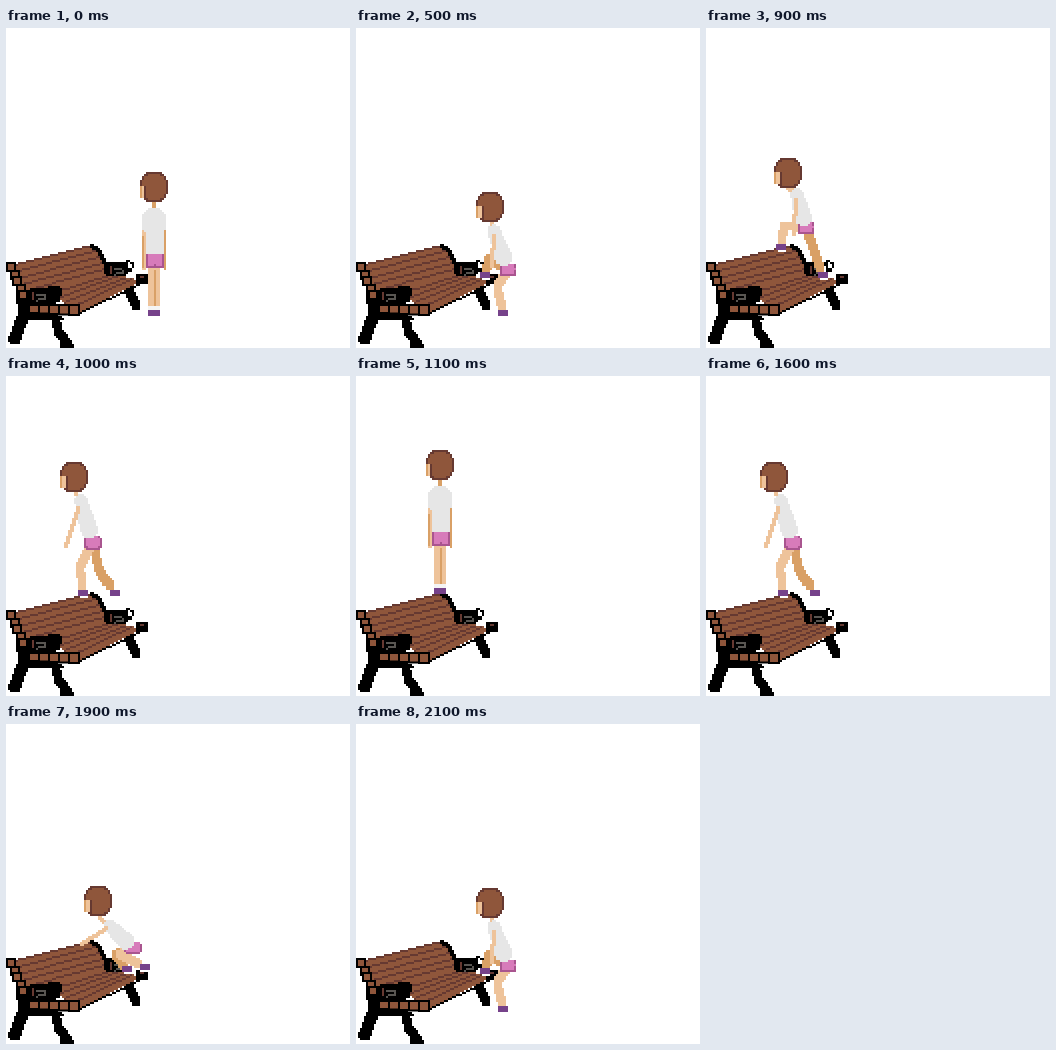
Write an HTML page with a canvas that moves like this. It is 344 px wide and 320 px high and loops after 2120 ms.

```html
<!DOCTYPE html>
<html lang="en">
<head>
<meta charset="utf-8">
<title>Bench climb</title>
<style>
html, body { margin: 0; width: 100%; height: 100%; overflow: hidden; background: #fff; }
canvas { display: block; width: 344px; height: 320px; image-rendering: pixelated; }
</style>
</head>
<body>
<canvas id="stage" width="344" height="320"></canvas>
<script>
(() => {
  const ctx = document.getElementById('stage').getContext('2d');
  const CELL = 2, LOOP = 2120, STEP = 100;
  const BLACK = '#000', WHITE = '#fff', WOOD = '#8f563b', DARK = '#663931', IRON = '#595652';
  const SKIN = '#eec39a', TAN = '#d9a066', SHIRT = '#e6e6e6', PINK = '#d77bba', PLUM = '#a9558f', SHOE = '#76428a';

  const snap = v => Math.round(v / CELL) * CELL;
  const lerp = (a, b, k) => a.map((v, i) => v + (b[i] - v) * k);

  function rect(x, y, w, h, color) {
    ctx.fillStyle = color;
    ctx.fillRect(snap(x), snap(y), w, h);
  }

  // Square brush dragged through points
  function brush(w, color, ...pts) {
    for (let i = 1; i < pts.length; i++) {
      const [x1, y1] = pts[i - 1], [x2, y2] = pts[i];
      const n = Math.max(1, Math.ceil(Math.max(Math.abs(x2 - x1), Math.abs(y2 - y1)) / CELL));
      for (let k = 0; k <= n; k++) {
        const [x, y] = lerp(pts[i - 1], pts[i], k / n);
        rect(x - w / 2, y - w / 2, w, w, color);
      }
    }
  }

  // Superellipse on the coarse grid; a higher power gives squarer corners
  function blob(x, y, rx, ry, power, color) {
    for (let cy = snap(y - ry); cy < y + ry; cy += CELL) {
      const d = Math.abs((cy + 1 - y) / ry);
      if (d >= 1) continue;
      const half = rx * (1 - d ** power) ** (1 / power);
      const left = snap(x - half);
      rect(left, cy, Math.max(0, snap(x + half) - left), CELL, color);
    }
  }

  // Fills between two lines, each given as left point and right point
  function panel(top, bottom, color) {
    const n = 60;
    for (let k = 0; k <= n; k++) {
      brush(CELL, color, lerp(top[0], bottom[0], k / n), lerp(top[1], bottom[1], k / n));
    }
  }

  function plankEnd(x, y, w, h) {
    rect(x, y, w, h, BLACK);
    rect(x + 2, y + 2, w - 4, h - 4, WOOD);
  }

  function slats(top, bottom, count) {
    panel(top, bottom, WOOD);
    for (let i = 0; i < count; i++) {
      brush(CELL, DARK, lerp(top[0], bottom[0], i / count), lerp(top[1], bottom[1], i / count));
    }
  }

  function armrest(x, y, w, h) {
    blob(x + w / 2, y + h / 2, w / 2, h / 2, 4, BLACK);
    brush(2, IRON, [x + 10, y + 7], [x + 18, y + 7], [x + 18, y + 11], [x + 11, y + 12]);
    brush(2, DARK, [x + 7, y + 5], [x + 7, y + 11]);
  }

  function bench() {
    // legs
    panel([[11, 259], [24, 272]], [[13, 291], [57, 291]], BLACK);
    brush(10, BLACK, [16, 290], [11, 304], [9, 310]);
    brush(8, BLACK, [50, 292], [52, 304], [62, 316]);
    rect(2, 308, 10, 6, BLACK);
    rect(54, 316, 14, 4, BLACK);
    brush(8, BLACK, [122, 262], [126, 270], [130, 278]);

    slats([[9, 237], [86, 217]], [[23, 269], [103, 247]], 5);
    slats([[46, 265], [104, 247]], [[73, 283], [133, 253]], 4);
    brush(2, BLACK, [73, 285], [133, 257]);
    brush(4, BLACK, [86, 218], [92, 222], [104, 246]);

    // plank ends
    for (let i = 0; i < 5; i++) plankEnd(i * 3, 234 + i * 7, 10, 10);
    for (let i = 0; i < 5; i++) plankEnd(22 + i * 10, 276, 12, 10 + i / 2);

    armrest(20, 260, 34, 16);
    brush(4, BLACK, [44, 260], [52, 259], [54, 266]);
    armrest(98, 234, 24, 14);
    brush(2, BLACK, [119, 237], [121, 233], [127, 235], [127, 239]);
    brush(4, BLACK, [118, 240], [124, 242]);
    blob(136, 251, 6, 6, 3, BLACK);
    rect(134, 248, 4, 2, DARK);
  }

  function head([x, y], face) {
    x = snap(x);
    y = snap(y);
    blob(x + 14, y + 15, 14, 15, 2.7, DARK);
    blob(x + 14, y + 15, 12, 13, 2.7, WOOD);
    rect(x, y + 14, 2, 12, TAN);
    rect(x + 2, y + 14, face, 12, SKIN);
    rect(x + 2 + face, y + 14, 2, 14, DARK);
  }

  function stand(x, y) {
    ctx.save();
    ctx.translate(x, y);
    brush(4, TAN, [14, 30], [14, 36]);
    // legs, socks, shoes
    rect(8, 96, 12, 40, SKIN);
    rect(14, 98, 2, 36, TAN);
    rect(8, 134, 12, 4, '#f4f4f4');
    rect(8, 138, 12, 6, SHOE);
    // arms
    rect(2, 48, 4, 50, SKIN);
    rect(2, 64, 2, 32, TAN);
    rect(24, 50, 2, 48, TAN);
    // shirt and shorts
    blob(14, 50, 12, 14, 2.5, SHIRT);
    rect(6, 44, 18, 38, SHIRT);
    rect(6, 82, 18, 14, PLUM);
    rect(8, 82, 14, 12, PINK);
    rect(14, 92, 2, 4, PLUM);
    head([0, 0], 2);
    ctx.restore();
  }

  function leg(hip, knee, foot, color) {
    const ankle = lerp(knee, foot, 0.75);
    brush(8, WHITE, ankle, foot);
    brush(8, color, hip, knee, ankle);
    rect(foot[0] - 5, foot[1] - 3, 10, 6, SHOE);
  }

  function climber(p) {
    leg(p.hip, p.farKnee, p.farFoot, TAN);
    leg(p.hip, p.nearKnee, p.nearFoot, SKIN);
    blob(...p.hip, 8.5, 7, 4, PLUM);
    blob(p.hip[0], p.hip[1] - 1, 7, 6, 4, PINK);
    brush(4, SKIN, [p.head[0] + 15, p.head[1] + 30], p.shoulder);
    for (let k = 0; k <= 1; k += 0.05) {
      blob(...lerp(p.shoulder, p.hip, k * 0.72), 6.5 + 2.5 * k, 6.5 + 2 * k, 2, SHIRT);
    }
    brush(4, SKIN, lerp(p.shoulder, p.hand, 0.15), p.hand);
    head(p.head, 4);
  }

  function between(a, b) {
    return Object.fromEntries(Object.keys(a).map(key => [key, lerp(a[key], b[key], 0.5)]));
  }

  const stepUp = {
    head: [120, 164], shoulder: [138, 203], hip: [152, 242], hand: [136, 238],
    nearKnee: [141, 258], nearFoot: [147, 285], farKnee: [133, 230], farFoot: [129, 247]
  };
  const crouch = {
    head: [78, 162], shoulder: [104, 202], hip: [127, 224], hand: [76, 220],
    nearKnee: [113, 230], nearFoot: [138, 243], farKnee: [109, 230], farFoot: [121, 245]
  };
  const reach = {
    head: [67, 130], shoulder: [91, 167], hip: [100, 200], hand: [87, 206],
    nearKnee: [78, 197], nearFoot: [75, 219], farKnee: [108, 222], farFoot: [117, 247]
  };
  const arrive = {
    head: [54, 86], shoulder: [75, 125], hip: [87, 167], hand: [60, 170],
    nearKnee: [74, 190], nearFoot: [77, 217], farKnee: [93, 194], farFoot: [108, 216]
  };
  const climb = [stepUp, between(stepUp, crouch), crouch, between(crouch, reach), reach, arrive];

  function draw(t) {
    rect(0, 0, 344, 320, WHITE);
    bench();
    const step = start => Math.floor((t - start) / STEP);
    if (t < 500) stand(134, 144);
    else if (t < 1100) climber(climb[step(500)]);
    else if (t < 1600) stand(70, 74);
    else climber(climb[5 - step(1600)]);
  }

  function tick() {
    draw(performance.now() % LOOP);
    requestAnimationFrame(tick);
  }
  tick();
})();
</script>
</body>
</html>
```
